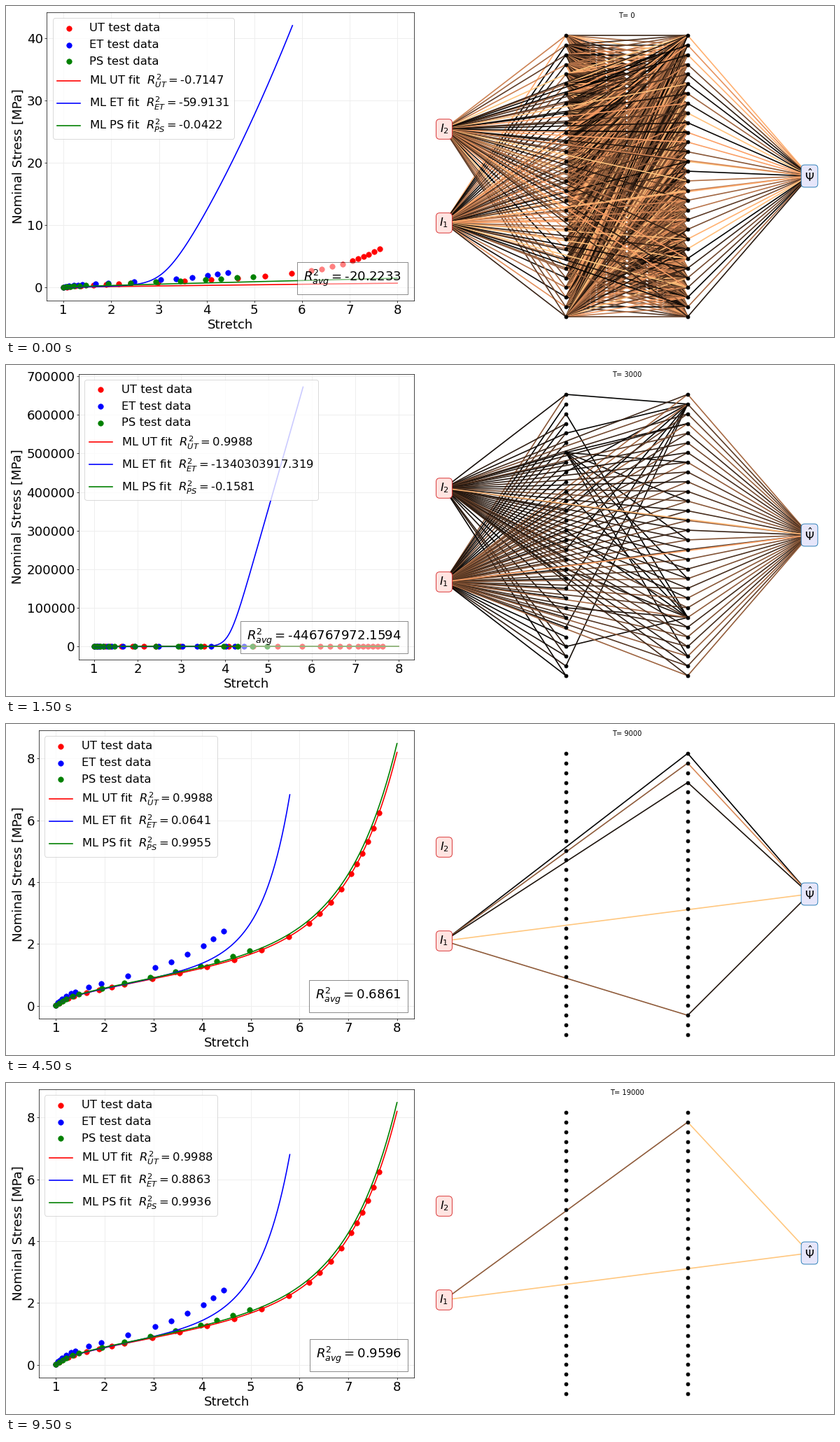
These frames come from a looping animation (1183 px wide and 473 px high, 10 s). A matplotlib script:

```python
import numpy as np
import matplotlib.pyplot as plt
from matplotlib.animation import FuncAnimation
from matplotlib.collections import LineCollection
from matplotlib.offsetbox import AnchoredText

W, H, DPI = 1183, 473, 64
SMALL, MEDIUM, LARGE = 11.09, 18.48, 20.33
plt.rcParams.update({
    "font.family": "DejaVu Sans",
    "axes.labelsize": LARGE, "axes.labelpad": 3.7,
    "xtick.labelsize": LARGE, "ytick.labelsize": LARGE,
    "xtick.major.size": 3.2, "ytick.major.size": 3.2,
    "xtick.major.pad": 2.6, "ytick.major.pad": 3.2,
    "legend.fontsize": MEDIUM, "legend.labelspacing": .54,
    "lines.linewidth": 1.85,
})


# Stress-stretch curves
def uniaxial(x):
    return .26 * (x - x ** -2) + .08 * (1 - np.exp(6 - 6 * x)) + 6.04 * np.exp(x - 8)


def equibiaxial(x):
    return .35 * (x - x ** -5) + .86 * np.exp(1.15 * (x - 4.44))


def shear(x):
    return 1.07 * uniaxial(x)


def samples(*keys):
    """Stretches of a test, linear between (index, stretch) keys."""
    index, stretch = zip(*keys)
    return np.interp(np.arange(index[-1] + 1), index, stretch)


TESTS = [
    ("UT", "red", uniaxial, samples((0, 1), (2, 1.13), (4, 1.37), (8, 2.41), (14, 5.78),
                                    (15, 6.19), (17, 6.64), (19, 7.06), (24, 7.63))),
    ("ET", "blue", equibiaxial, samples((0, 1), (3, 1.12), (6, 1.40), (8, 1.93),
                                        (10, 3.03), (13, 4.02), (15, 4.44))),
    ("PS", "green", shear, samples((0, 1), (3, 1.21), (5, 1.47), (7, 2.41),
                                   (10, 3.97), (13, 4.97))),
]

# Key frames of the R2 scores (UT, ET, PS)
SCORE_KEYS = {
    0: (-.7147, -59.9131, -.0422), 1: (.9979, -33156049.8403, -1.1849),
    3: (.9988, -1340303917.319, -.1581), 5: (.9989, -22002302.8485, .8697),
    7: (.9989, -.7224, .997), 11: (.9988, .8868, .994), 19: (.9988, .8863, .9936)}
# Key frames of the early ET fit: log peak, knee, width, curvature, jump
KNEE_KEYS = {0: (np.log(41.05), 3.05, .22, .13, 0), 1: (np.log(27450), 3.45, .12, 0, 0),
             3: (np.log(672000), 4.1, .12, 0, 0), 5: (np.log(58100), 4.45, .08, 1, .42)}


def between(keys, n):
    return [np.interp(n, list(keys), column) for column in zip(*keys.values())]


def scores(n):
    scaled = {k: np.arcsinh(v) for k, v in SCORE_KEYS.items()}
    return [round(float(np.sinh(v)), 4) for v in between(scaled, n)]


def et_fit(n, x):
    if n >= 6:
        peak = 4.55 + 186 * np.exp(-4.4 * (n - 7))
        rate = 1.7 + 1.3 * np.exp(7 - n)
        return uniaxial(x) + peak * np.exp(rate * (x - 5.8))
    log_peak, knee, width, curvature, jump = between(KNEE_KEYS, n)
    ramp = width * np.logaddexp(0, (x - knee) / width)
    ramp += curvature * ramp ** 2
    step = 1 / (1 + np.exp((knee - x) / width))
    shape = (1 - jump) * ramp / ramp[-1] + jump * step
    return np.exp(log_peak) * shape + .2 * (x - 1)


def fits(n):
    x, short = np.linspace(1, 8, 300), np.linspace(1, 5.8, 300)
    if n == 0:
        ut, ps = .087 * (x - x ** -2), .187 * (x - x ** -2)
    else:
        ut = uniaxial(x)
        ps = 1.035 * ut
    return [(x, ut), (short, et_fit(n, short)), (x, ps)]


# Network: two inputs, two hidden layers of 30 nodes, one output
N = 30
I1, I2, PSI = (626, 310), (626, 176), (1148, 243)
ROWS = 42 + np.arange(N) * 402 / (N - 1)
H1 = [(800, y) for y in ROWS]
H2 = [(974, y) for y in ROWS]
MAIN, SECOND = 1, 27  # hidden nodes that outlast the others
rng = np.random.default_rng(4)


def lives(base, spread, limit=10):
    """Last frame in which each link of a layer is present."""
    return np.minimum(base + rng.exponential(spread, N).astype(int), limit)


src, dst = np.divmod(np.arange(N * N), N)
hidden_life = np.where(rng.random(N * N) < .25, 2, 1)
hubs = np.isin(dst, [MAIN, 23]) | (src == 6)
hidden_life[hubs & ((src + dst) % 4 == 1)] = 3

out_life = lives(5 + 2 * (np.arange(N) % 2), 1)
out_life[[MAIN, SECOND]] = 99, 14
skip_life = lives(4, .7)
skip_life[MAIN] = 7

layers = [  # links with the last frame of each
    ([(I1, p) for p in H1], lives(3, 2, 7)),
    ([(I2, p) for p in H1], lives(2, 1.2, 4)),
    ([(p, q) for p in H1 for q in H2], hidden_life),
    ([(p, PSI) for p in H2], out_life),
    ([(I1, p) for p in H2], out_life),
    ([(I2, p) for p in H2], skip_life),
    ([(I1, PSI), (I2, PSI)], [99, 7]),
]
segments = np.concatenate([links for links, _ in layers]).astype(float)
life = np.concatenate([last for _, last in layers])
noise = rng.random(len(segments))
spread = np.full(len(segments), .25)
spread[2 * N:2 * N + N * N] = .05 + .3 * src / (N - 1)
OUT = 2 * N + N * N


def strengths(n):
    """Link weights between 0 and 1, fading as a link nears its end."""
    if n == 0:
        return noise ** 1.25
    w = np.minimum(.45, .09 * (life - n)) + noise * spread / n * (n < 7)
    w[OUT + MAIN] = .1 + .065 * n
    w[OUT + SECOND] = .06 * (11 - n)
    w[-2:] = .6 + .07 * n, 1.6 - .23 * n
    return np.clip(w, 0, 1)


fig = plt.figure(figsize=(W / DPI, H / DPI), dpi=DPI, facecolor="white")
net = fig.add_axes([0, 0, 1, 1], zorder=-1)
net.set(xlim=(0, W), ylim=(H, 0))
net.axis("off")
links = net.add_collection(LineCollection([], linewidths=1.85, zorder=1))
net.plot(*np.array(H1 + H2).T, "o", color="black", ms=5.6, mew=.9, zorder=2)
for pos, label, face, edge in [(I1, "$I_1$", "mistyrose", "tab:red"),
                               (I2, "$I_2$", "mistyrose", "tab:red"),
                               (PSI, r"$\hat{\Psi}$", "lavender", "tab:blue")]:
    net.text(*pos, label, size=MEDIUM, ha="center", va="center", zorder=3,
             bbox=dict(boxstyle="round,pad=0.3", fc=face, ec=edge, lw=1))
title = net.text(887, 17, "", size=SMALL, ha="center", va="baseline")
ax = fig.add_axes([.05, .11, .44, .87])


def fit_axes():
    """Leave room for the widest and the highest tick label."""
    low, high = ax.get_ylim()
    last = max(t for t in ax.get_yticks() if t <= high)
    left, right, bottom = 35.5 + 11.45 * len(f"{last:.0f}"), 583, 421
    top = max(9.2, bottom - (bottom - 16) * (high - low) / (last - low))
    ax.set_position([left / W, 1 - bottom / H, (right - left) / W, (bottom - top) / H])


def draw_plot(n):
    ax.clear()
    r2 = scores(n)
    for name, color, stress, stretch in TESTS:
        ax.scatter(stretch, stress(stretch), s=68, color=color, label=f"{name} test data")
    for (name, color, *_), (x, y), score in zip(TESTS, fits(n), r2):
        ax.plot(x, y, color=color, label=f"ML {name} fit  $R^2_{{{name}}}=${score}")
    ax.set(xlabel="Stretch", ylabel="Nominal Stress [MPa]")
    ax.grid(color="#eeeeee", lw=1.1)
    ax.set_axisbelow(True)
    ax.legend(loc="upper left")

    box = AnchoredText(f"$R^2_{{avg}}=${round(sum(r2) / 3, 4)}", loc="lower right",
                       pad=.5, borderpad=.5, prop=dict(size=LARGE))
    box.patch.set_alpha(.5)
    ax.add_artist(box)
    fit_axes()


def update(n):
    draw_plot(n)
    alive = life >= n
    links.set_segments(segments[alive])
    links.set_color(plt.cm.copper(strengths(n)[alive]))
    title.set_text(f"T= {1000 * n}")
    return []


anim = FuncAnimation(fig, update, frames=20, interval=500, repeat=True,
                     repeat_delay=0, blit=False)
plt.show()
```
